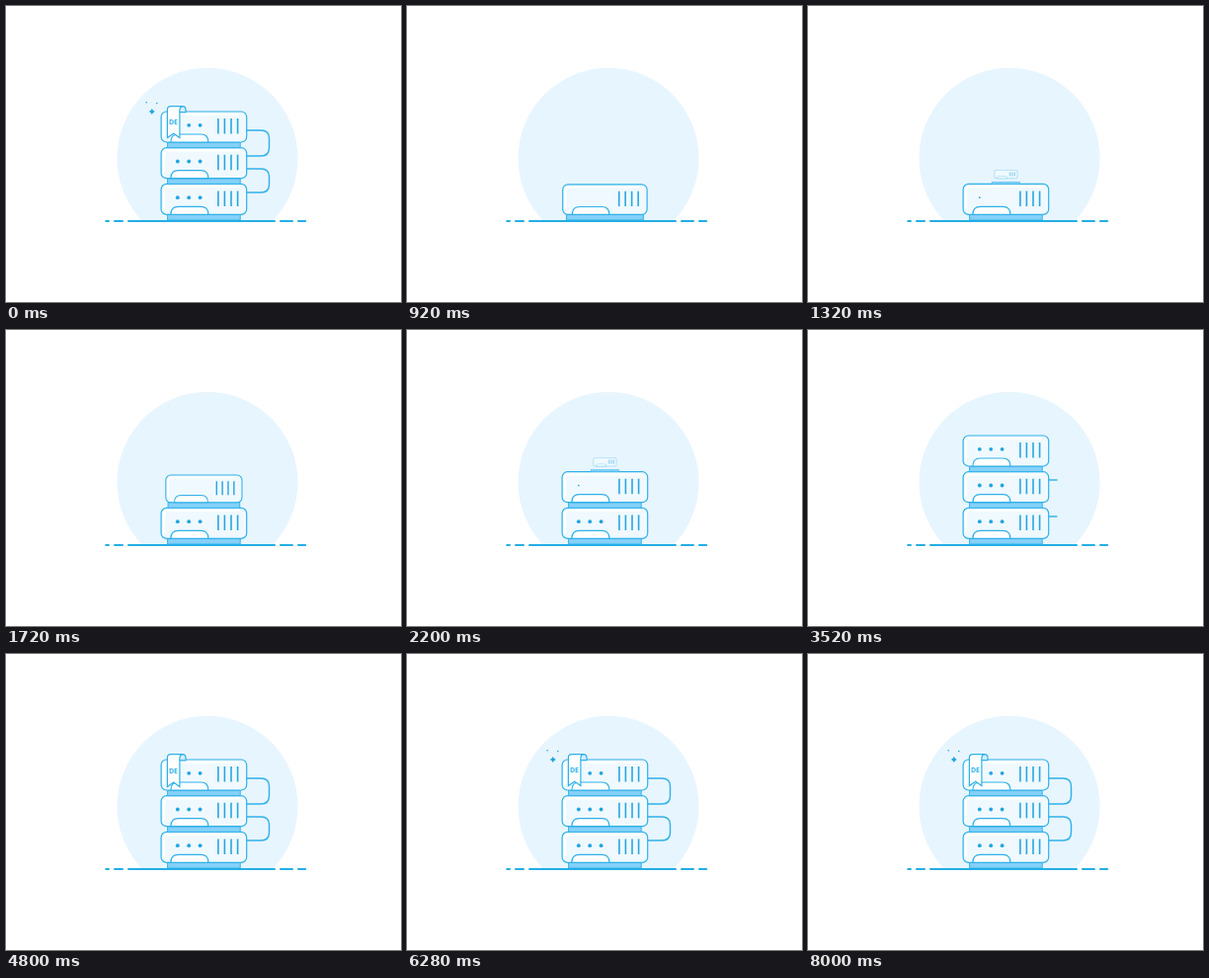
These frames come from a looping animation (400x300 px, 8040 ms). An HTML page:

```html
<!DOCTYPE html>
<html lang="en">
<head>
<meta charset="utf-8">
<title>Server stack</title>
<style>
  html, body { margin: 0; width: 100%; height: 100%; overflow: hidden; background: #fff; }
  svg { display: block; width: 100vw; height: 100vh; }
  .line { fill: none; stroke: #2fb1e8; stroke-width: 1.4; }
  .blue { fill: #23a5e0; }
  text { font: bold 7px "Open Sans", Arial, sans-serif; text-anchor: middle; fill: #2fb1e8; }
</style>
</head>
<body>
<svg viewBox="0 0 400 300">
  <defs>
    <clipPath id="sky"><rect width="400" height="218"/></clipPath>
    <g id="body">
      <rect x="-43.3" y="-31" width="86.6" height="31" rx="5.5" fill="#eff9ff"/>
      <path d="M-40.5 -6V-24Q-40.5 -28.3 -36 -28.3H36" fill="none" stroke="#fff" stroke-width="2"/>
      <rect class="line" style="stroke-width:1.2" x="-43.3" y="-31" width="86.6" height="31" rx="5.5"/>
      <path class="line" style="fill:#fff;stroke-width:1.2" d="M-33.5 0Q-33.5 -8 -26 -8H-3Q4.5 -8 4.5 0Z"/>
      <path class="line" style="stroke:#2aa6df;stroke-width:1.6" d="M14.5 -24V-8.5M21 -24V-8.5M27.6 -24V-8.5M34.2 -24V-8.5"/>
    </g>
  </defs>
  <circle cx="204" cy="154.3" r="91.5" fill="#e7f5fe" clip-path="url(#sky)"/>
  <path class="cable line" pathLength="1" d="M243.5 189H258Q266.5 189 266.5 181V173Q266.5 165 258 165H243.5"/>
  <path class="cable line" pathLength="1" d="M243.5 152H258Q266.5 152 266.5 144V134Q266.5 126 258 126H243.5"/>
  <g id="stack"></g>
  <path class="line" style="stroke-width:2;stroke:#23aee4" stroke-linecap="round"
    d="M101.2 218H104M110 218H118M124 218H272M278 218H290M296 218H303.2"/>
  <g id="tag">
    <path class="line" style="fill:#d5eefc;stroke-width:1.2" d="M168 101.6H178.5Q182 101.6 182 105V107.6H176Z"/>
    <path class="line" style="fill:#fff;stroke-width:1.2" d="M163.4 133.6V105Q163.4 101.6 167 101.6H179Q175.9 102 175.9 105.5V133.6L169.7 129.2Z"/>
    <text x="169.5" y="120.3">DE</text>
  </g>
  <g class="spark blue"><circle r="0.8"/></g>
  <g class="spark blue"><circle r="0.8"/></g>
  <g class="spark blue"><path d="M0 -3Q.8 -.8 3 0Q.8 .8 0 3Q-.8 .8 -3 0Q-.8 -.8 0 -3Z"/></g>
</svg>
<script>
const LOOP = 8040, STEP = 880, MID = 200.4;
const $ = s => [...document.querySelectorAll(s)];
const clamp = x => Math.min(1, Math.max(0, x));
const ease = x => (x = clamp(x), x * x * (3 - 2 * x));
const span = (t, from, to) => ease((t - from) / (to - from));
const set = (el, x, y, sx, sy = sx) => {
  el.setAttribute('transform', `translate(${x} ${y}) scale(${sx} ${sy})`);
  el.style.display = sx > 0.001 && sy > 0.001 ? '' : 'none';
};

// Grow past full size, then settle back.
const pop = (t, grow, settle) => 1.1 * span(t, 0, grow) - 0.1 * span(t, grow, grow + settle);

const stack = $('#stack')[0];
const servers = [0, 1, 2].map(i => {
  const g = document.createElementNS('http://www.w3.org/2000/svg', 'g');
  g.innerHTML = `
    <g><rect x="-36.8" y="-5.6" width="73.6" height="5.6" fill="#86d0f8" stroke="#35b4ec"/></g>
    <use href="#body"/>` + '<g class="blue"><circle r="1.9"/></g>'.repeat(3);
  stack.append(g);
  const [base, body, ...dots] = g.children;
  return { base, body, dots, y: 211.4 - 36.7 * i };
});
const cables = $('.cable'), tag = $('#tag')[0], sparks = $('.spark');
const sparkAt = [[142.2, 97.8], [152.8, 98.6], [147.8, 107]];

function draw(t) {
  servers.forEach(({ base, body, dots, y }, i) => {
    const age = t - 40 - STEP * i;
    set(base, MID, y + 5.6, pop(age, 1000, 140));
    set(body, MID, y, pop(age - 80, 1000, 140));
    dots.forEach((dot, k) =>
      set(dot, 173.8 + 11.4 * k, y - 17.2, span(age, 1220 + 70 * k, 1350 + 70 * k)));
  });

  const drawn = span(t, 3310, 4210);
  cables.forEach(c => {
    c.style.strokeDasharray = `${drawn} 2`;
    c.style.display = drawn ? '' : 'none';
  });

  // The ribbon unrolls from its fold.
  const roll = 1.04 * span(t, 4530, 4820) - 0.04 * span(t, 4820, 5040);
  set(tag, 0, 101 * (1 - roll), 1, roll);

  const twinkle = 0.75 + 0.25 * Math.cos((t - 8000) / 860 * 2 * Math.PI);
  sparks.forEach((s, k) => set(s, ...sparkAt[k], twinkle * span(t, 4980, 5400)));
}

function tick() {
  const t = performance.now() % LOOP;
  draw(t < 40 ? 8000 : t);
  requestAnimationFrame(tick);
}
tick();
</script>
</body>
</html>
```
